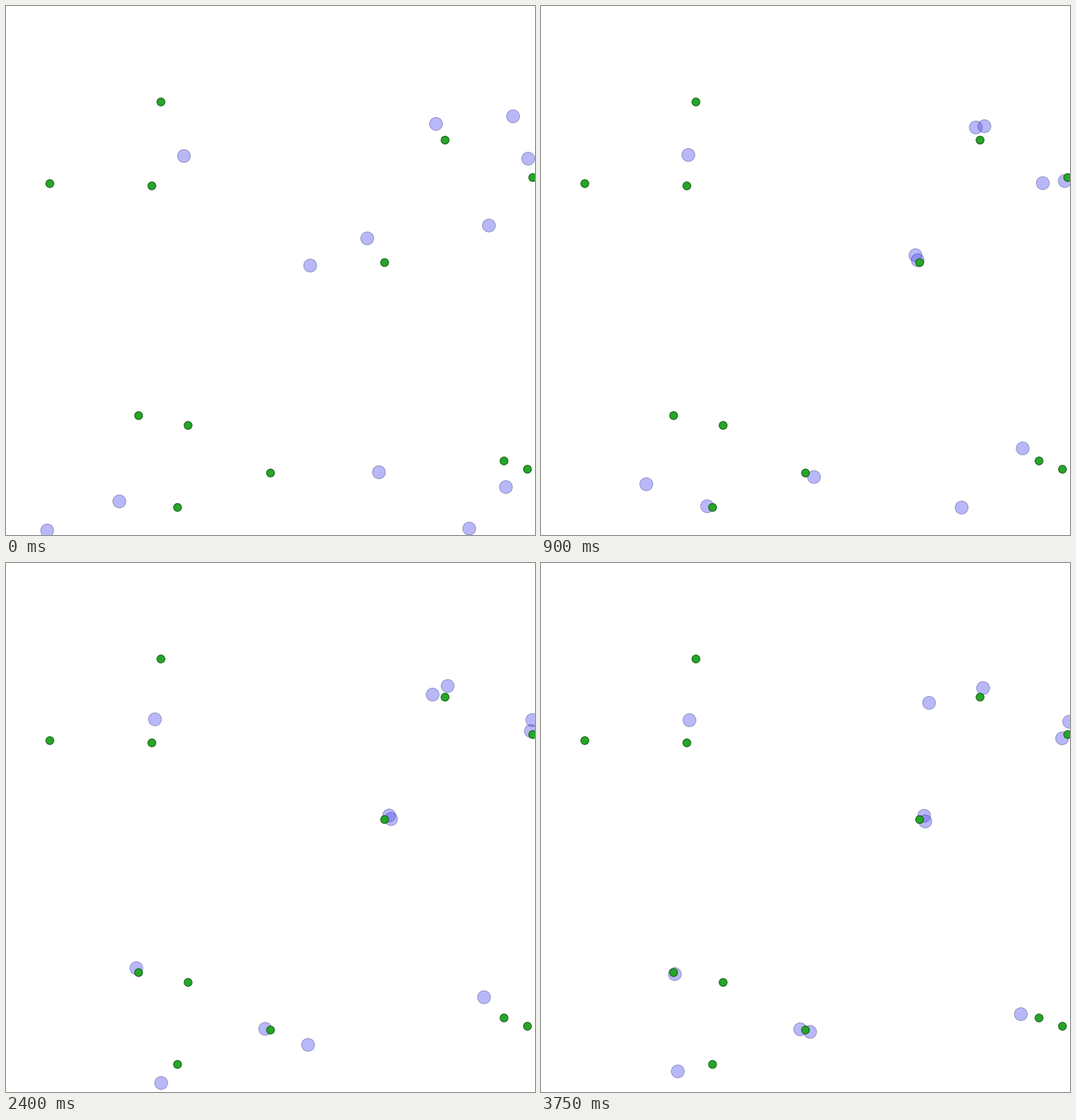
A matplotlib script for the animation above (3900 ms loop, 700 px wide and 700 px high).

```python
import numpy as np
import matplotlib.pyplot as plt
from matplotlib.animation import FuncAnimation
from matplotlib.patches import Circle

SIZE, DPI = 700, 100
FRAMES, INTERVAL = 26, 150

FOOD = [
    (205, 127), (58, 235), (193, 238), (581, 177.5), (697, 227), (501, 339.5),
    (175.5, 542), (241, 555), (350, 618), (227, 663.5), (659, 602), (690, 613),
]


def glide(start, v_start, home, steps, end, v_home=(0, 0), sway=(0, 0), swings=1):
    """Steer from start to home in the given steps, then drift to end.

    Velocities are in pixels per step; sway swings about the drifting line.
    """
    start, v_start, home, end, v_home, sway = map(
        np.array, (start, v_start, home, end, v_home, sway))
    t = np.arange(FRAMES)[:, None]

    u = np.minimum(t / steps, 1)
    ease = u * u * (3 - 2 * u)
    approach = (start + ease * (home - start)
                + steps * u * (1 - u) * ((1 - u) * v_start - u * v_home))

    d = np.maximum(t - steps, 0) / (FRAMES - 1 - steps)
    return approach + d * (end - home) + np.sin(np.pi * swings * d) * sway


paths = [
    # top right
    glide((569, 156), (0.5, -1), (581.5, 170.5), 13, (513.5, 185)),
    glide((671, 146), (-17, -1), (584, 160), 7, (585, 165.5)),
    glide((691, 202), (3, 10), (684, 229.5), 13, (689.5, 232), sway=(13, -11)),
    glide((639, 290.5), (0, -11), (695.5, 207), 13, (699, 210)),
    # top left and centre
    glide((235.5, 198.5), (-16.5, -6.5), (197.5, 206), 10, (196.5, 208)),
    glide((478, 307.5), (2, 6), (507, 334), 12, (507, 334.5)),
    glide((402.5, 343.5), (13, -2), (510.5, 336), 8, (508.5, 342)),
    # bottom
    glide((493.5, 617), (-14, -2), (343, 616), 8, (343, 617), v_home=(0, -7)),
    glide((661.5, 636.5), (-4.5, -8), (631, 569.5), 10, (635, 597),
          sway=(0, 10), swings=3),
    glide((613, 691.5), (-8, -6.5), (354.5, 630.5), 18, (356, 620.5),
          v_home=(-24, -4)),
    glide((150, 655.5), (13, -8), (227, 680), 8, (181, 680.5),
          v_home=(0, 10), sway=(0, 9), swings=17 / 3),
    glide((54.5, 694), (14, 0.5), (171, 533.5), 13, (177, 544), v_home=(-6, -6)),
]

fig = plt.figure(figsize=(SIZE / DPI, SIZE / DPI), dpi=DPI, facecolor="white")
ax = fig.add_axes([0, 0, 1, 1])
ax.set(xlim=(0, SIZE), ylim=(SIZE, 0))
ax.axis("off")


def add_dot(center, radius, face, edge, z):
    dot = Circle(center, radius, facecolor=face, edgecolor=edge,
                 linewidth=72 / DPI, zorder=z)
    return ax.add_patch(dot)


agents = [add_dot(p[0], 8.6, (0.31, 0.31, 0.94, 0.4), (0, 0, 0.3, 0.3), 2)
          for p in paths]
for spot in FOOD:
    add_dot(spot, 5.2, (0.15, 0.65, 0.16), (0.08, 0.36, 0.08), 3)


def update(step):
    for agent, p in zip(agents, paths):
        agent.center = p[step]
    return agents


anim = FuncAnimation(fig, update, frames=FRAMES, interval=INTERVAL,
                     repeat=True, repeat_delay=0)
plt.show()
```
